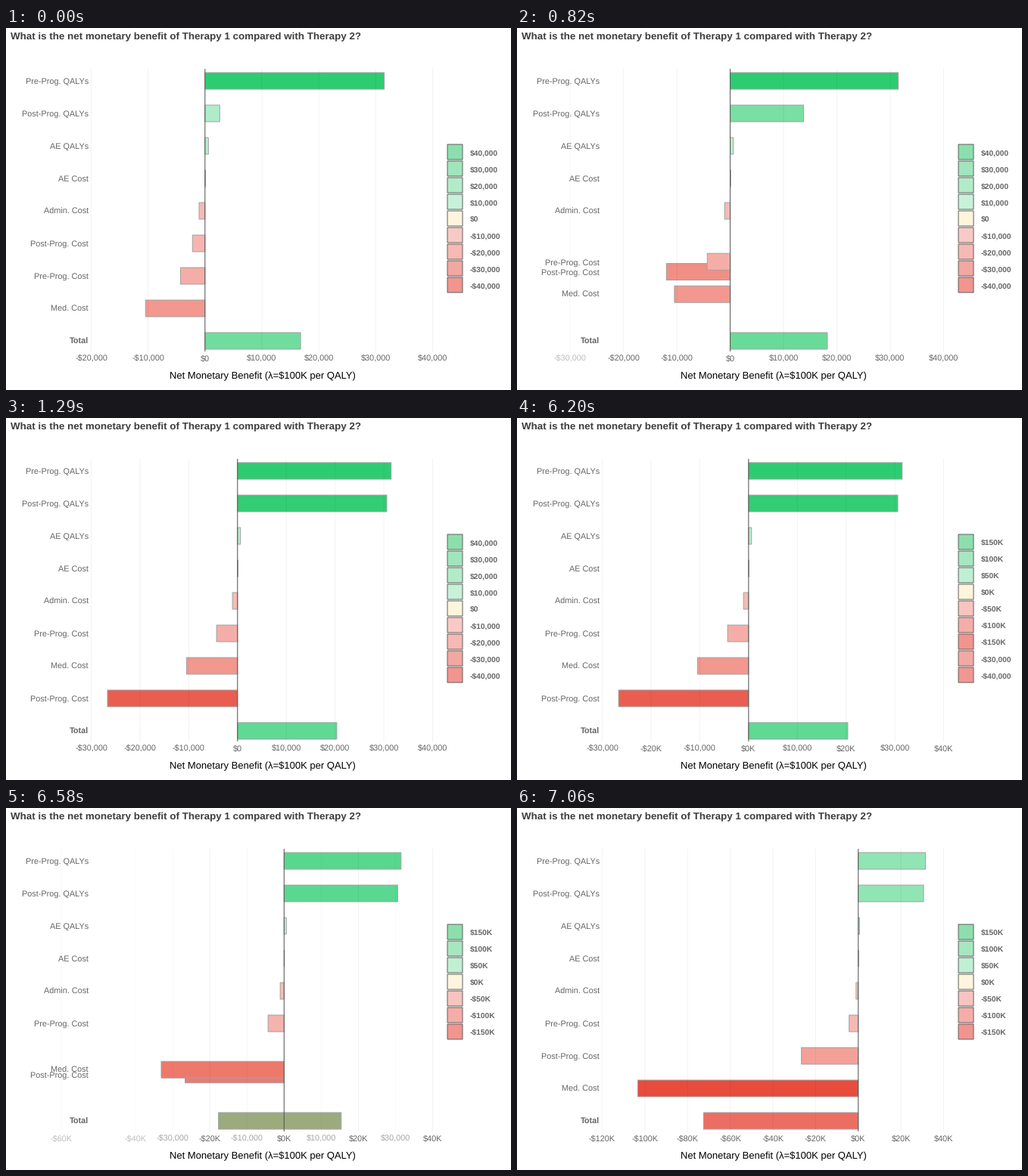
Recreate the animation shown at these times as a matplotlib script. Size 667x479 px, loop 8000 ms.

```python
import matplotlib.pyplot as plt
from matplotlib.animation import FuncAnimation
from matplotlib.patches import Rectangle

W, H, DPI = 667, 479, 100
LOOP, STEP = 8000, 20
PX = 72 / DPI

plt.rcParams["font.family"] = "Liberation Sans"
plt.rcParams["text.hinting"] = "none"
plt.rcParams["path.snap"] = False

LEFT, RIGHT, TOP, BOTTOM = 112.5, 563.5, 54, 428
ROW_TOP, ROW_GAP, BAR_H = 70, 43, 22
LAST_TICK = 40000

# Value of each bar in the three states
VALUES = {
    "Post-Prog. Cost": (-2200, -26660, -26660),
    "Pre-Prog. QALYs": (31500, 31500, 31500),
    "Post-Prog. QALYs": (2590, 30600, 30600),
    "AE QALYs": (600, 600, 600),
    "AE Cost": (100, 100, 100),
    "Admin. Cost": (-1040, -1040, -1040),
    "Pre-Prog. Cost": (-4300, -4300, -4300),
    "Med. Cost": (-10450, -10450, -103300),
}
TICKS = (
    range(-20000, 40001, 10000),
    range(-30000, 40001, 10000),
    range(-120000, 40001, 20000),
)
GREEN = ((187, 240, 210), (46, 204, 113))
RED = ((247, 190, 184), (231, 76, 61))
KEY_GREEN = ((218, 247, 230), (140, 223, 172))
KEY_RED = ((250, 220, 216), (241, 149, 142))
KEY_ZERO = (254, 245, 220)

# (first visible change, start of the easing)
MOVES = ((500, 390), (6200, 6154))
MOVE_TIME, KEY_FADE = 900, 250


def ease(u):
    u = min(max(u, 0), 1)
    return 4 * u ** 3 if u < 0.5 else 1 - 4 * (1 - u) ** 3


def mix(a, b, p):
    return a + (b - a) * p


def blend(pair, p):
    return tuple(mix(a, b, p) for a, b in zip(*pair))


def rgb(color):
    return tuple(c / 255 for c in color)


def money(v, short):
    sign = "-" if v < 0 else ""
    return f"{sign}${abs(v) // 1000}K" if short else f"{sign}${abs(v):,}"


def scale(state, v):
    low = TICKS[state][0]
    return LEFT + (v - low) / (LAST_TICK - low) * (RIGHT - LEFT)


def layout(state):
    """Left, right, centre and colour of every bar in one state."""
    vals = {name: v[state] for name, v in VALUES.items()}
    order = sorted(vals, key=vals.get, reverse=True) + ["Total"]
    vals["Total"] = sum(vals.values())
    peak = max(abs(v) for v in vals.values())
    bars = {}
    for name, v in vals.items():
        ends = sorted((scale(state, 0), scale(state, v)))
        y = ROW_TOP + ROW_GAP * order.index(name)
        color = blend(GREEN if v > 0 else RED, abs(v) / peak)
        bars[name] = (*ends, y, *color)
    return bars


def key_entries(step, count, short):
    entries = []
    for k in range(count, -count - 1, -1):
        pair = KEY_GREEN if k > 0 else KEY_RED
        color = blend(pair, abs(k) / count) if k else KEY_ZERO
        entries.append((money(k * step, short), rgb(color)))
    return entries


LAYOUTS = [layout(s) for s in range(3)]
KEYS = (key_entries(10000, 4, False), key_entries(50000, 3, True))

fig = plt.figure(figsize=(W / DPI, H / DPI), dpi=DPI, facecolor="white")
ax = fig.add_axes([0, 0, 1, 1])
ax.set_xlim(0, W)
ax.set_ylim(H, 0)
ax.axis("off")


def label(x, y, text, size, color="#666666", ha="left", bold=False):
    return ax.text(x, y, text, fontsize=size * PX, color=color, ha=ha,
                   va="baseline", weight="bold" if bold else "normal", zorder=5)


def box(x, y, w, h, edge):
    return ax.add_patch(Rectangle((x, y), w, h, edgecolor=edge,
                                  linewidth=PX, zorder=2))


def vline(color, alpha, z):
    return ax.plot([0, 0], [TOP, BOTTOM], color=color, alpha=alpha,
                   linewidth=PX, solid_capstyle="butt", zorder=z)[0]


label(6, 15, "What is the net monetary benefit of Therapy 1 compared with Therapy 2?",
      13.43, "#3d3d3d", bold=True)
label(338.5, 464.5, "Net Monetary Benefit (λ=$100K per QALY)".replace("$", r"\$"),
      13, "black", "center")

bars = {name: (box(0, 0, 1, BAR_H, "#a2a2a2"),
               label(109, 0, name, 10.9, ha="right", bold=name == "Total"))
        for name in LAYOUTS[0]}
ticks = {v: (vline("black", 0.05, 3), label(0, 440, "", 10.9, ha="center"))
         for v in sorted(set().union(*TICKS))}
zero = vline("#555555", 1, 4)
keys = [(box(583, 154 + 22 * i, 20, 20, "#606060"),
         label(613, 168 + 22 * i, "", 10.3, bold=True))
        for i in range(len(KEYS[0]))]
for _, text in list(ticks.values()) + keys:
    text.set_parse_math(False)


def draw(frame):
    t = frame * STEP
    a = 1 if t >= MOVES[1][0] else 0
    b = a + 1
    shown, start = MOVES[a]
    p = ease((t - start) / MOVE_TIME) if t >= shown else 0

    for name, (rect, text) in bars.items():
        x0, x1, y, *color = blend((LAYOUTS[a][name], LAYOUTS[b][name]), p)
        rect.set_bounds(x0, y - BAR_H / 2, x1 - x0, BAR_H)
        rect.set_facecolor(rgb(color))
        text.set_y(y + 4)

    for v, (line, text) in ticks.items():
        x = mix(scale(a, v), scale(b, v), p)
        alpha = mix(v in TICKS[a], v in TICKS[b], p)
        line.set_xdata([x, x])
        line.set_alpha(0.05 * alpha)
        text.set_x(x)
        text.set_alpha(alpha)
        text.set_text(money(v, a == 1 and v in TICKS[2]))
        line.set_visible(alpha > 0)
        text.set_visible(alpha > 0)
        if v == 0:
            zero.set_xdata([x, x])

    for i, (rect, text) in enumerate(keys):
        stale = i >= len(KEYS[a])
        name, color = KEYS[0 if stale else a][i]
        alpha = 1 - ease((t - start) / KEY_FADE) if stale else 1
        rect.set_facecolor(color)
        text.set_text(name)
        rect.set_alpha(alpha)
        text.set_alpha(alpha)
    return []


anim = FuncAnimation(fig, draw, frames=LOOP // STEP, interval=STEP,
                     repeat=True, repeat_delay=0)
plt.show()
```
